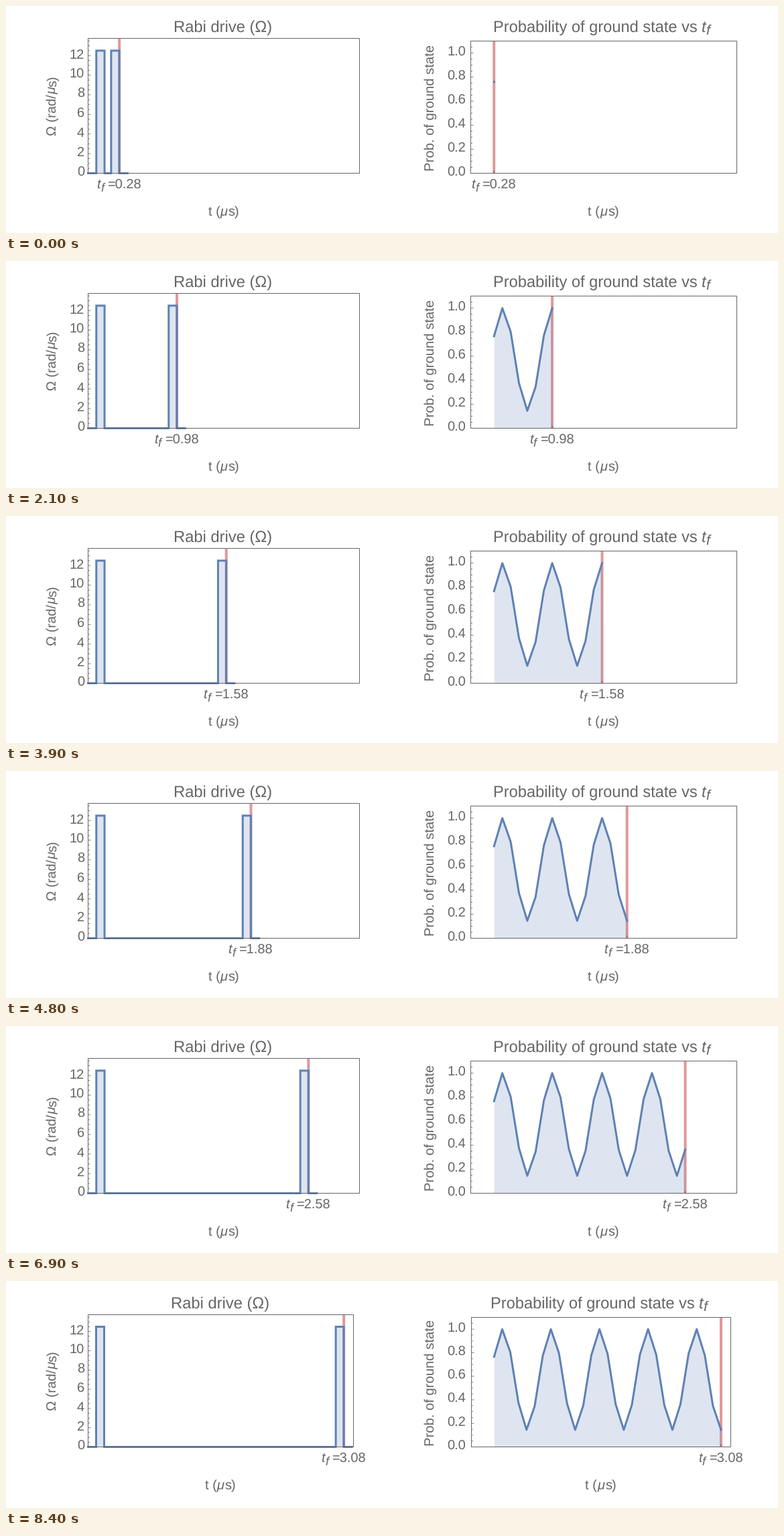
These frames come from a looping animation (1152x340 px, 8.7 s). A matplotlib script:

```python
import numpy as np
import matplotlib.pyplot as plt
from matplotlib.animation import FuncAnimation
from matplotlib.patches import Rectangle
from matplotlib.transforms import Bbox

W, H, DPI = 1152, 340, 100
STEPS, STEP_MS = 29, 300
PX = 72 / DPI
GREY, BLUE, RED = "#666666", "#5e81b5", "#df999a"

plt.rcParams["font.family"] = "Liberation Sans"
plt.rcParams["text.hinting"] = "none"
plt.rcParams["path.snap"] = False

fig = plt.figure(figsize=(W / DPI, H / DPI), dpi=DPI, facecolor="white")
ax = fig.add_axes([0, 0, 1, 1])


class Panel:
    """Pixel box of one plot and the data range it shows."""

    def __init__(self, left, right, top, bottom, xr, ymax):
        self.left, self.right, self.top, self.bottom = left, right, top, bottom
        self.xr, self.ymax = xr, ymax
        self.mid = (left + right) / 2

    def x(self, t):
        lo, hi = self.xr
        return self.left + (np.asarray(t) - lo) / (hi - lo) * (self.right - self.left)

    def y(self, v):
        return self.bottom - np.asarray(v) / self.ymax * (self.bottom - self.top)


def text(x, y, s, size=20, italic=False, **kw):
    return ax.text(x, y, s, fontsize=size * PX, color=GREY, va="baseline",
                   style="italic" if italic else "normal", zorder=6, **kw)


def upright(x, y, s, size=20, italic=False):
    text(x, y, s, size, italic, rotation=90, rotation_mode="anchor")


def line(xs, ys, color, width, z, cap="butt", join="miter"):
    ax.plot(xs, ys, color=color, lw=width * PX, zorder=z,
            solid_capstyle=cap, solid_joinstyle=join)


def fill(p, xs, ys):
    ax.fill_between(xs, ys, p.bottom, color=BLUE, alpha=0.2, lw=0, zorder=2)


def frame(p, step, fmt, label_x):
    ax.add_patch(Rectangle((p.left, p.top), p.right - p.left, p.bottom - p.top,
                           fill=False, ec=GREY, lw=PX, zorder=5))
    minor = step / 4
    for i in range(int(p.ymax / minor + 1e-6) + 1):
        y = p.y(i * minor)
        major = i % 4 == 0
        line([p.left, p.left + (4 if major else 2.5)], [y, y], GREY, 0.8, 5)
        if major:
            text(label_x, y + 4.3, fmt.format(i * minor), ha="right")


def marker(p, tf, edge):
    x = float(p.x(tf))
    line([x, x], [p.top, p.bottom], RED, 4, 1)
    line([x, x], [p.bottom - 4, p.bottom], GREY, 1, 5)
    x, base = x - 0.7, p.bottom + 23.5
    clip = Bbox.from_extents(0, 0, edge, H)
    for dx, dy, s, size, ital in ((-33.5, 0, "t", 20, True), (-27.5, 4, "f", 18, True),
                                  (-17.3, 0, f"={tf:.2f}", 20, False)):
        text(x + dx, base + dy, s, size, ital, clip_on=True, clip_box=clip)


def time_label(p):
    x, y = p.mid - 23.5, p.bottom + 63.5
    text(x, y, "t (")
    text(x + 17.8, y, "μ", italic=True)
    text(x + 29.6, y, "s)")


def probability(k):
    return 0.5725 + 0.4275 * np.cos(np.pi / 3 * (k - 1) - 0.054 + 0.003 * k)


def draw_drive(p, tf):
    frame(p, 2, "{:.0f}", 117)
    marker(p, tf, 528)
    text(p.mid - 1.3, p.top - 9.5, "Rabi drive (Ω)", 23.7, ha="center")
    time_label(p)
    upright(75, 194.5, "Ω (rad/")
    upright(75, 132.5, "μ", italic=True)
    upright(75, 121, "s)")
    ts, vs = [-0.1], [0]
    for a, b in ((0, 0.1), (tf - 0.1, tf)):
        fill(p, p.x([a, b]), p.y([12.5, 12.5]))
        ts += [a, a, b, b]
        vs += [0, 12.5, 12.5, 0]
    line(p.x(ts + [tf + 0.1]), p.y(vs + [0]), BLUE, 3, 3, "projecting")


def draw_prob(p, tf, k):
    frame(p, 0.2, "{:.1f}", 686)
    marker(p, tf, 1092)
    x, y = p.mid - 164.8, p.top - 13.5
    text(x, y, "Probability of ground state vs", 23.6)
    text(x + 311, y, "t", 23.6, True)
    text(x + 317.5, y + 4, "f", 21, True)
    time_label(p)
    upright(639, 247, "Prob. of ground state", 20.3)
    n = np.arange(k + 1)
    xs, ys = p.x(0.28 + 0.1 * n), p.y(probability(n))
    if k == 0:
        ax.plot(xs, ys, "s", color=BLUE, ms=3 * PX, mew=0, zorder=3)
    else:
        fill(p, xs, ys)
        line(xs, ys, BLUE, 3, 3, "projecting", "round")


def draw(k):
    ax.clear()
    ax.set(xlim=(0, W), ylim=(H, 0))
    ax.axis("off")
    tf = 0.28 + 0.1 * k
    # The last time label overhangs, so both plots shrink to make room.
    if k < STEPS - 1:
        drive = Panel(122.5, 527.5, 48.5, 250.5, (-0.1, 3.2), 13.75)
        prob = Panel(693.5, 1090.5, 52.5, 250.5, (0, 3.2), 1.1)
    else:
        drive = Panel(122.5, 518.5, 50.5, 248.5, (-0.1, 3.2), 13.75)
        prob = Panel(694.5, 1081.5, 54.5, 248.5, (0, 3.2), 1.1)
    draw_drive(drive, tf)
    draw_prob(prob, tf, k)
    return []


anim = FuncAnimation(fig, draw, frames=STEPS, init_func=lambda: draw(0),
                     interval=STEP_MS, repeat=True, repeat_delay=0)
plt.show()
```
